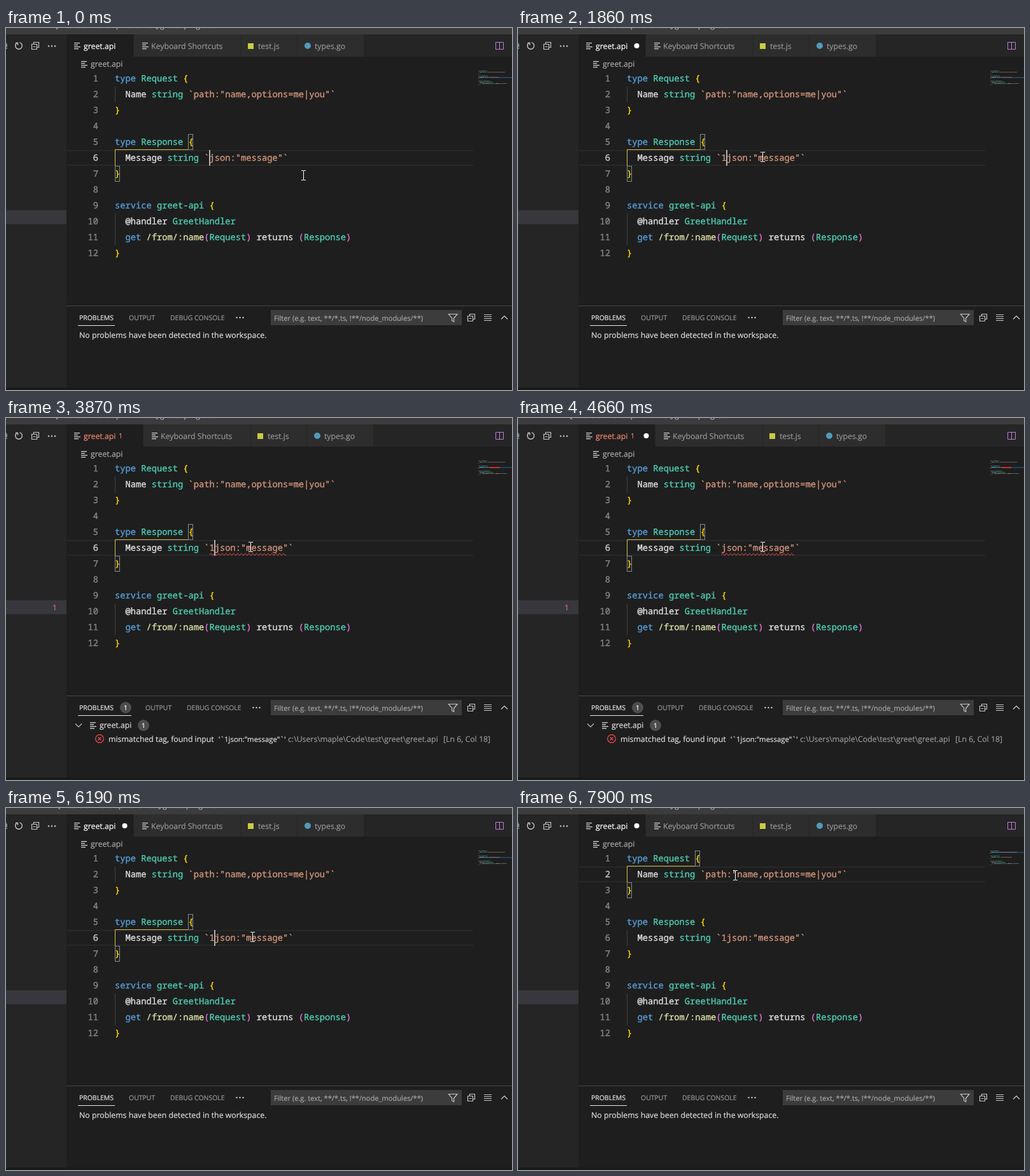
These frames come from a looping animation (795 by 570 pixels, 8 s). An HTML page:

```html
<!DOCTYPE html>
<html lang="en">
<head>
<meta charset="utf-8">
<title>Editor diagnostics</title>
<style>
  html, body { margin: 0; width: 100%; height: 100%; overflow: hidden; background: #1e1e1e; }
  svg { display: block; width: 795px; height: 570px; }
  text { font-family: "Open Sans", "Noto Sans", sans-serif; font-size: 12.3px; stroke-width: .2px; white-space: pre; text-rendering: geometricPrecision; }
  .code { font-family: "Noto Sans Mono", "DejaVu Sans Mono", monospace; font-size: 13.75px; font-weight: 500; stroke-width: .4px; }
  .head { font-size: 10.45px; }
  .small { font-size: 11.1px; }
  .title { font-size: 11.4px; }
</style>
</head>
<body>
<svg id="stage" viewBox="0 0 795 570"></svg>
<script>
const LOOP = 8000, LEFT = 171, CHAR = 8.25, ROW = 25, TOP = 67;
const BLUE = '#569cd6', TEAL = '#4ec9b0', GOLD = '#ffd700', ORANGE = '#ce9178',
      PLAIN = '#dcdcdc', CREAM = '#dcdcaa', PINK = '#da70d6', RED = '#f14c4c', ICON = '#c5c5c5';

// Each token: column, colour, text
const codeLines = extra => [
  [[0, BLUE, 'type'], [5, TEAL, 'Request'], [13, GOLD, '{']],
  [[2, PLAIN, 'Name'], [7, TEAL, 'string'], [14, ORANGE, '`path:"name,options=me|you"`']],
  [[0, GOLD, '}']],
  [],
  [[0, BLUE, 'type'], [5, TEAL, 'Response'], [14, GOLD, '{']],
  [[2, PLAIN, 'Message'], [10, TEAL, 'string'], [17, ORANGE, '`' + extra + 'json:"message"`']],
  [[0, GOLD, '}']],
  [],
  [[0, BLUE, 'service'], [8, TEAL, 'greet-api'], [18, GOLD, '{']],
  [[2, PLAIN, '@handler'], [11, TEAL, 'GreetHandler']],
  [[2, BLUE, 'get'], [6, CREAM, '/from/:name'], [17, PINK, '('], [18, TEAL, 'Request'], [25, PINK, ')'],
   [27, PLAIN, 'returns'], [35, PINK, '('], [36, TEAL, 'Response'], [44, PINK, ')']],
  [[0, GOLD, '}']],
];

// Changes to the editor state, applied in order
const changes = [
  [0, { extra: '', dirty: false, squiggle: false, listed: false, line: 6, match: 6 }],
  [1860, { extra: '1', dirty: true }],
  [2850, { dirty: false, squiggle: true }],
  [2920, { listed: true }],
  [4200, { extra: '', dirty: true }],
  [5190, { dirty: false, squiggle: false }],
  [5260, { listed: false }],
  [6190, { extra: '1', dirty: true }],
  [7430, { line: 2 }],
  [7500, { match: 2 }],
];

const caretOn = [[0, 70], [580, 1120], [1590, 2320], [2850, 3340], [3870, 4660],
                 [5190, 5660], [6190, 6690], [7160, 7900]];

const pointer = [
  [0, 467, 232], [980, 449, 225], [1050, 417, 212], [1120, 391, 204], [1190, 384, 203],
  [5590, 387, 203], [6260, 384, 197], [6330, 377, 184], [6400, 367, 165], [6470, 356, 144],
  [6540, 347, 126], [6610, 340, 112], [6750, 336, 105], [6820, 335, 103],
  [6960, 336, 104], [7030, 338, 105], [7100, 340, 106], [7230, 341, 106],
];

const rect = (x, y, w, h, fill, more = '') =>
  `<rect x="${x}" y="${y}" width="${w}" height="${h}" fill="${fill}" ${more}/>`;
const text = (x, y, s, fill, cls = '', more = '') =>
  `<text x="${x}" y="${y}" fill="${fill}" stroke="${fill}" class="${cls}" ${more}>${s}</text>`;
const path = (d, stroke, width = 1) =>
  `<path d="${d}" fill="none" stroke="${stroke}" stroke-width="${width}"/>`;
const disc = (x, y, r, fill) => `<circle cx="${x}" cy="${y}" r="${r}" fill="${fill}"/>`;
const dots = (x, y) => [0, 5, 10].map(d => disc(x + d, y, 1.25, ICON)).join('');
const fileIcon = (x, y) => [9, 6, 10, 7].map((w, i) => rect(x, y + 3 * i, w, 1.4, ICON)).join('');
const badge = (x, y) => disc(x, y, 9, '#4d4d4d') +
  text(x, y + 4, '1', '#fff', 'head', 'text-anchor="middle"');
const collapseIcon = (x, y) =>
  path(`M${x - 2.5} ${y - 2.5}v-3h8v8h-3M${x - 5.5} ${y - 2.5}h8v8h-8zM${x - 3.5} ${y + 1.5}h4`, ICON, 1.2);
const rowY = n => TOP + (n - 1) * ROW;
const colX = c => LEFT + c * CHAR;

function sidebar(s) {
  return rect(0, 10, 95, 560, '#252526') + rect(0, 287, 95, 22, '#37373d') +
    path('M0 24h1M0 32h2M1 25v5', ICON, 1.2) +
    path('M16.5 24a5.3 5.3 0 1 0 5-1.2M15 23.5h3.5v3.5', ICON, 1.4) +
    collapseIcon(46, 28) + dots(67, 28.5) +
    (s.listed ? text(73, 302.5, '1', '#e0705d') : '');
}

function tabs(s) {
  const shift = s.listed ? 15 : 0;
  const label = (x, name) => text(x + shift, 33, name, '#969696');
  const tab = (x, w) => rect(x + shift, 10, w, 35, '#2d2d2d');
  return rect(95, 10, 700, 35, '#252526') + rect(95, 10, 105 + shift, 35, '#1e1e1e') +
    fileIcon(107, 23) +
    text(122, 33, 'greet.api', s.listed ? '#f48771' : '#fff') +
    (s.listed ? text(177, 32, '1', '#f48771', 'small') : '') +
    (s.dirty ? disc(186.5 + shift, 28, 4, '#fff') : '') +
    tab(201, 168) + fileIcon(214 + shift, 23) + label(228, 'Keyboard Shortcuts') +
    tab(370, 87) + rect(380 + shift, 24, 9, 9, '#cbcb41') + label(396, 'test.js') +
    tab(458, 104) + disc(474 + shift, 28, 5, '#519aba') + label(485, 'types.go') +
    path('M769.5 22.5h12v11h-12zM775.5 22.5v11', '#c27bdb') +
    fileIcon(118, 52) + text(133, 61, 'greet.api', '#a9a9a9');
}

function minimap(s, lines) {
  const y = n => TOP + 2 * (n - 1);
  let out = rect(742, y(s.match), 53, 2, '#264f78', 'opacity=".7"');
  lines.forEach((tokens, i) => tokens.forEach(([col, fill, word]) => {
    out += rect(742 + col, y(i + 1), word.length, 1, fill, 'opacity=".5"');
  }));
  return out + (s.squiggle ? rect(760, y(6), 15, 2, '#d02f2f') : '');
}

function editor(s) {
  const lines = codeLines(s.extra);
  const y = rowY(s.line), openLine = s.match - 1;
  const openX = Math.floor(colX(lines[openLine - 1].at(-1)[0]));
  const box = (x, n) => rect(x + .5, rowY(n) + .5, 7, 24, '#1d241d', 'stroke="#888"');
  let out = rect(96, y, 638, 2, '#282828') + rect(96, y + 23, 638, 2, '#282828');
  for (const [n, h] of [[2, 1], [6, 1], [10, 2]])
    out += rect(171, rowY(n), 1, h * ROW, '#404040');
  out += path(`M${openX} ${rowY(s.match) - .5}H171.5V${rowY(s.match) + 25}`, '#d9c04a') +
    box(openX, openLine) + box(171, s.match + 1);
  lines.forEach((tokens, i) => {
    const base = rowY(i + 1) + 17;
    out += text(145, base, i + 1, i + 1 === s.line ? '#c6c6c6' : '#858585', 'code', 'text-anchor="end"');
    for (const [col, fill, word] of tokens) out += text(colX(col), base, word, fill, 'code');
  });
  if (s.squiggle) {
    const count = Math.floor((14 + s.extra.length) * CHAR / 6);
    out += path('M320 215.5' + 'q1.5 -4 3 -1t3 1'.repeat(count), RED);
  }
  return out + minimap(s, lines);
}

function panel(s) {
  const shift = s.squiggle ? 26 : 0;
  let out = rect(95, 437, 700, 1, '#444') +
    text(115, 460, 'PROBLEMS', '#e7e7e7', 'head') + rect(113, 468, 58 + shift, 1, '#e7e7e7') +
    (s.squiggle ? badge(188, 456) : '') +
    text(193 + shift, 460, 'OUTPUT', '#989898', 'head') +
    text(258 + shift, 460, 'DEBUG CONSOLE', '#989898', 'head') + dots(362.5 + shift, 456) +
    rect(416, 444, 300, 24, '#3c3c3c') +
    text(421, 461, 'Filter (e.g. text, **/*.ts, !**/node_modules/**)', '#a6a6a6', 'small') +
    path('M695.5 450.5h13.5l-5.3 6.5v5.5l-3-1.5v-4z', ICON, 1.2) +
    collapseIcon(731, 456) +
    path('M751 451.5h12M751 454.5h12M751 457.5h12M751 460.5h12', ICON) +
    path('M778 458.5l5-5 5 5', ICON, 1.3);
  if (!s.listed)
    return out + text(115, 488, 'No problems have been detected in the workspace.', '#ddd');
  return out + path('M109 481.5l5 5 5-5', ICON, 1.2) + fileIcon(132, 479) +
    text(147, 488, 'greet.api', '#ddd') + badge(216, 484) +
    `<circle cx="147" cy="505" r="6.3" fill="none" stroke="${RED}" stroke-width="1.2"/>` +
    path('M144.5 502.5l5 5m0-5l-5 5', RED, 1.2) +
    text(161, 510, 'mismatched tag, found input', '#ddd') +
    text(334, 510, '\'`1json:"message"`\'', '#ddd', 'title') +
    text(443, 510, 'c:\\Users\\maple\\Code\\test\\greet\\greet.api', '#989898') +
    text(687, 510, '[Ln 6, Col 18]', '#989898');
}

function titleBar(s) {
  return rect(0, 0, 795, 10, '#3c3c3c') +
    text(s.dirty ? 72 : 78, 0, (s.dirty ? '● ' : '') + '[Extension Development Host] greet.api - greet', '#b9a9c2', 'title');
}

function ibeam([, x, y]) {
  return path(`M${x - 3} ${y - 7.5}h3l.5.5.5-.5h3M${x + .5} ${y - 7}v14` +
    `M${x - 3} ${y + 7.5}h3l.5-.5.5.5h3`, '#fff');
}

function draw(t) {
  const s = Object.assign({}, ...changes.filter(c => c[0] <= t).map(c => c[1]));
  const caretX = s.line === 2 ? 335 : s.extra ? 327 : 319;
  const blink = caretOn.some(([from, to]) => t >= from && t < to);
  return rect(0, 0, 795, 570, '#1e1e1e') + sidebar(s) + tabs(s) + titleBar(s) + editor(s) + panel(s) +
    rect(0, 566, 795, 4, '#1a1a1b') +
    (blink ? rect(caretX, rowY(s.line), 2, ROW, '#aeafad') : '') +
    ibeam(pointer.findLast(p => p[0] <= t));
}

const stage = document.getElementById('stage');
let shown = '';
const start = performance.now();
function tick(now) {
  const picture = draw(Math.max(0, now - start) % LOOP);
  if (picture !== shown) stage.innerHTML = shown = picture;
  requestAnimationFrame(tick);
}
tick(start);
</script>
</body>
</html>
```
